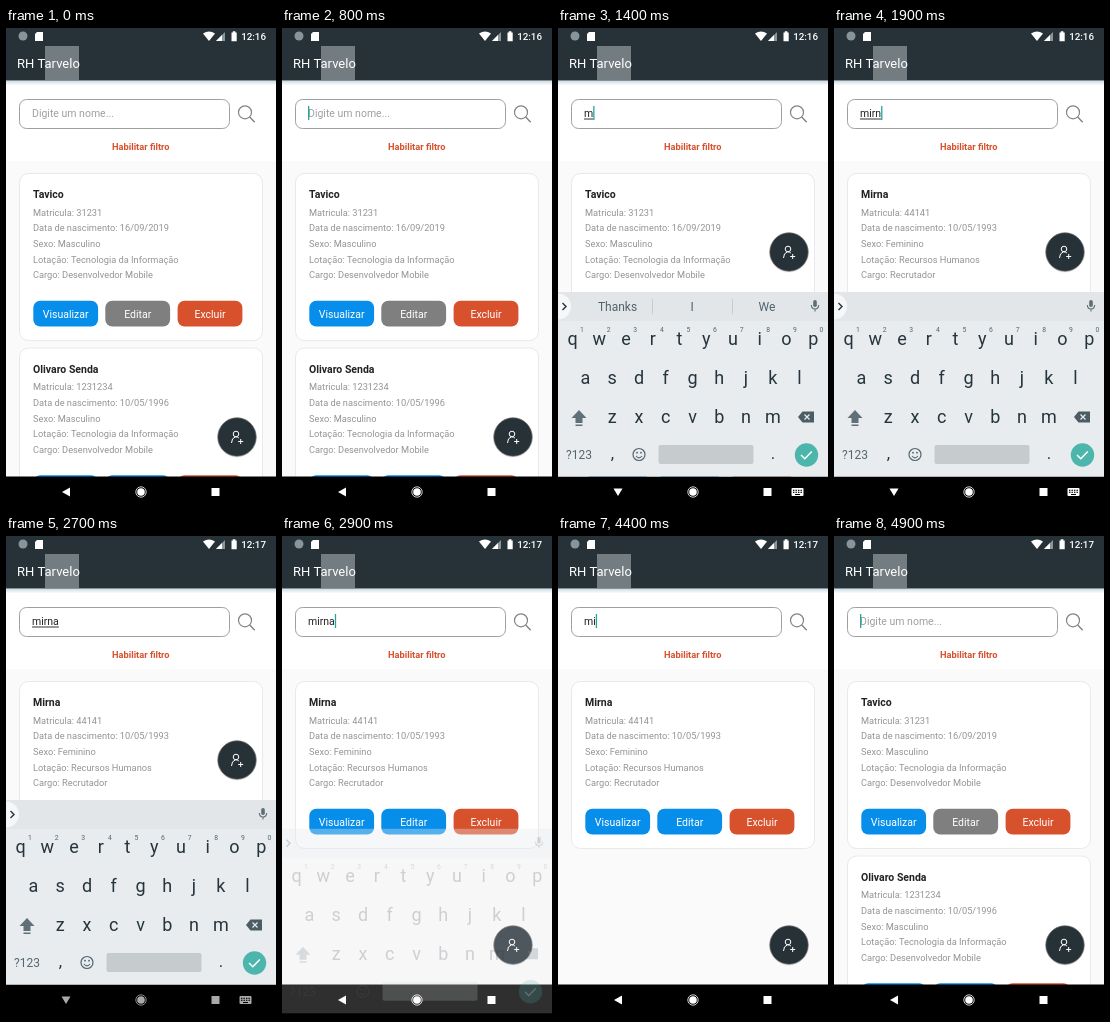
Animation of 270 by 480 pixels, one loop 5 s. Source, as an HTML page with a canvas:

```html
<!DOCTYPE html>
<html lang="pt">
<head>
<meta charset="utf-8">
<style>
html, body { margin: 0; width: 100%; height: 100%; overflow: hidden; background: #fafafa; }
canvas { display: block; width: 270px; height: 480px; }
</style>
</head>
<body>
<canvas></canvas>
<script>
const canvas = document.querySelector('canvas');
const c = canvas.getContext('2d');
const ratio = window.devicePixelRatio || 1;
canvas.width = 270 * ratio;
canvas.height = 480 * ratio;

const LOOP = 5000, STEP = 100;
const HEADER = 52.5, NAV = 448.5;
const DARK = '#263238', BLUE = '#078eeb', GRAY = '#7f7f80', RED = '#d8512d', KEY = '#26343b';

const people = {
  first: ['Tavico', '31231', '16/09/2019', 'Masculino', 'Tecnologia da Informação', 'Desenvolvedor Mobile'],
  second: ['Olivaro Senda', '1231234', '10/05/1996', 'Masculino', 'Tecnologia da Informação', 'Desenvolvedor Mobile'],
  found: ['Mirna', '44141', '10/05/1993', 'Feminino', 'Recursos Humanos', 'Recrutador']
};
const labels = ['Matricula', 'Data de nascimento', 'Sexo', 'Lotação', 'Cargo'];

// [start time, text in the search field]
const typing = [[0, ''], [1400, 'm'], [1500, 'mi'], [1700, 'mir'], [1900, 'mirn'], [2000, 'mirna'],
  [4100, 'mirn'], [4300, 'mir'], [4400, 'mi'], [4700, 'm'], [4900, '']];

const clamp = v => Math.max(0, Math.min(1, v));
const within = (t, a, b) => t >= a && t < b;

function text(s, x, y, size, color, align = 'left', weight = 400) {
  c.font = `${weight} ${size}px Roboto, sans-serif`;
  c.textAlign = align;
  c.fillStyle = color;
  c.fillText(s, x, y);
}

function rect(x, y, w, h, color) {
  c.fillStyle = color;
  c.fillRect(x, y, w, h);
}

function round(x, y, w, h, r, fill, stroke) {
  c.beginPath();
  c.roundRect(x, y, w, h, r);
  paint(fill, stroke);
}

function circle(x, y, r, fill, stroke, width) {
  c.beginPath();
  c.arc(x, y, r, 0, 7);
  paint(fill, stroke, width);
}

function path(d, fill, stroke, width, x = 0, y = 0) {
  c.save();
  c.translate(x, y);
  paint(fill, stroke, width, new Path2D(d));
  c.restore();
}

function paint(fill, stroke, width = 1, p) {
  if (fill) { c.fillStyle = fill; p ? c.fill(p) : c.fill(); }
  if (stroke) {
    c.strokeStyle = stroke;
    c.lineWidth = width;
    p ? c.stroke(p) : c.stroke();
  }
}

function header(t) {
  rect(0, 0, 270, HEADER, DARK);
  const shade = c.createLinearGradient(0, HEADER, 0, HEADER + 5);
  shade.addColorStop(0, 'rgba(70,120,145,.28)');
  shade.addColorStop(1, 'rgba(70,120,145,0)');
  rect(0, HEADER, 270, 5, shade);
  rect(39, 18, 34, 34, '#737c80');
  text('RH Tarvelo', 11, 39.5, 13, '#fff');

  circle(17, 8, 4.5, '#87949a');
  path('M31 4h6v9h-8v-7z', '#fff');
  path('M197 5.5q6-4 12 0l-6 7.5z', '#fff');
  path('M219 4v9h-9z', '#8b969b');
  path('M216 7v6h-6z', '#fff');
  path('M225.5 4.5h1.3v-1.2h2.6v1.2h1.3v8.7h-5.2z', '#fff');
  text(t < 2100 ? '12:16' : '12:17', 260, 12, 9.8, '#fff', 'right', 500);
}

function search(t) {
  const value = typing.filter(([start]) => t >= start).pop()[1];
  round(13.5, 71.5, 210, 29, 7, '#fff', '#a0a0a3');
  if (value) text(value, 26, 89, 10.5, '#222');
  else text('Digite um nome...', 26, 89, 10.5, '#a0a0a3');
  c.font = '400 10.5px Roboto, sans-serif';
  const end = 26 + c.measureText(value).width;
  if (within(t, 1400, 2800)) rect(26, 90.5, end - 26, 1, '#333');
  if (within(t, 700, 2200) || within(t, 2800, 3800) || t >= 4000) rect(end, 78, 1.3, 14, '#26a69a');

  circle(239, 84.3, 6.5, null, '#808386', 1.2);
  path('M243.7 89l5 5.3', null, '#808386', 1.4);
  text('Habilitar filtro', 134.8, 122.3, 9.25, RED, 'center', 700);
}

function button(label, x, y, color) {
  round(x, y, 64.8, 25.8, 7, color);
  text(label, x + 32.4, y + 17, 10.5, '#fff', 'center');
}

function card([name, ...values], y, editColor) {
  round(13.5, y + .5, 243, 167, 9, '#fff', '#e8e9eb');
  text(name, 27, y + 25, 10.5, '#222', 'left', 700);
  values.forEach((v, i) => text(`${labels[i]}: ${v}`, 27, y + 42.6 + i * 15.7, 9.25, '#949498'));
  button('Visualizar', 27.3, y + 127.7, BLUE);
  button('Editar', 99.3, y + 127.7, editColor);
  button('Excluir', 171.6, y + 127.7, RED);
}

function addButton(y) {
  circle(231, y + .7, 19.8, 'rgba(0,0,0,.08)');
  circle(231, y, 19.2, DARK, '#6b6866', .7);
  circle(230, y - 3, 2.8, null, '#fff', 1);
  path('M-5.5 6q0-5 4-6.2q2.2 0 3.4 1.2M3.7 2v5M1.2 4.5h5', null, '#fff', 1, 231, y);
}

function keyRow(keys, x, y) {
  [...keys].forEach((k, i) => text(k, x + i * 26.75, y, 18, KEY, 'center'));
}

function keyboard(t, shown) {
  c.save();
  c.globalAlpha = shown;
  c.translate(0, 45 * (1 - shown) ** 2);
  rect(0, 264, 270, NAV - 264, '#e8ecef');
  rect(0, 264, 270, 29, '#e2e6e9');

  circle(0, 278.5, 13, '#f6f7f8');
  path('M4.5 275l3.5 3.5l-3.5 3.5', null, KEY, 1.4);
  if (t < 1500) {
    ['Thanks', 'I', 'We'].forEach((word, i) => text(word, 59.5 + i * 74.7, 282.5, 12, '#51626b', 'center'));
    rect(94, 271, 1, 15, '#c6cdd1');
    rect(174, 271, 1, 15, '#c6cdd1');
  }
  round(255.2, 272, 3.6, 7, 1.8, '#5f6d75');
  path('M253.3 277q.3 4 3.7 4t3.7-4M257 281v2.5', null, '#5f6d75', 1.1);

  keyRow('qwertyuiop', 14.5, 317);
  [...'1234567890'].forEach((n, i) => text(n, 24 + i * 26.6, 304, 6.8, '#55656e', 'center'));
  keyRow('asdfghjkl', 27.5, 356);
  keyRow('zxcvbnm', 54.3, 395);
  path('M21 382l7.5 8h-4v5h-7v-5h-4zM17.5 396.5h7v1.5h-7z', '#607079');
  path('M244.5 383.5h11.5v11h-11.5l-4.5-5.5z', '#4b5c65');
  path('M246.5 386.5l5 5m0-5l-5 5', null, '#e8ecef', 1.2);

  text('?123', 21, 431, 12, '#55656e', 'center');
  text(',', 54.5, 431, 17, KEY, 'center');
  circle(81, 426.5, 6, null, '#55656e', 1.2);
  circle(79, 424.7, .9, '#55656e');
  circle(83, 424.7, .9, '#55656e');
  path('M78 428q3 3.7 6 0', null, '#55656e', 1.1);
  round(100.5, 417, 95, 19, 2, '#c6cbce');
  text('.', 215, 431, 17, KEY, 'center');
  circle(248.5, 427, 11.7, '#4db6ac');
  path('M243 427l3.8 3.8l7-7.3', null, '#fff', 1.5);
  c.restore();
}

function navigation(t, open) {
  const color = t === 2700 ? '#aaa' : '#fff';
  path(open ? 'M55.5 460.5h9l-4.5 7.5z' : 'M64 459.5v9l-8-4.5z', color);
  circle(135, 464, 5.2, null, color, .8);
  circle(135, 464, 3.8, color);
  rect(205.5, 460, 8, 8, color);
  if (!open) return;
  round(233.5, 460, 12, 8, 1, color);
  for (let i = 0; i < 4; i++) {
    rect(235 + i * 2.5, 461.7, 1.4, 1.2, '#000');
    rect(235 + i * 2.5, 463.7, 1.4, 1.2, '#000');
  }
  rect(237, 466, 5, 1, '#000');
}

function draw(t) {
  const shown = clamp((t - 850) / 250) * (1 - clamp((t - 2700) / 250));
  const open = within(t, 1100, 2800);
  c.setTransform(ratio, 0, 0, ratio, 0, 0);
  rect(0, 0, 270, 480, '#fafafa');
  rect(0, HEADER, 270, 133 - HEADER, '#fff');
  if (within(t, 1700, 4900)) {
    card(people.found, 145, BLUE);
  } else {
    card(people.first, 145, GRAY);
    card(people.second, 319.5, BLUE);
  }
  header(t);
  search(t);
  addButton(open ? 224 : 409);
  rect(0, NAV, 270, 480 - NAV, '#000');
  // The sliding keyboard is translucent over the navigation bar too.
  if (shown) keyboard(t, shown);
  navigation(t, open);
}

function frame() {
  draw(Math.floor(performance.now() % LOOP / STEP) * STEP);
  requestAnimationFrame(frame);
}
frame();
</script>
</body>
</html>
```
